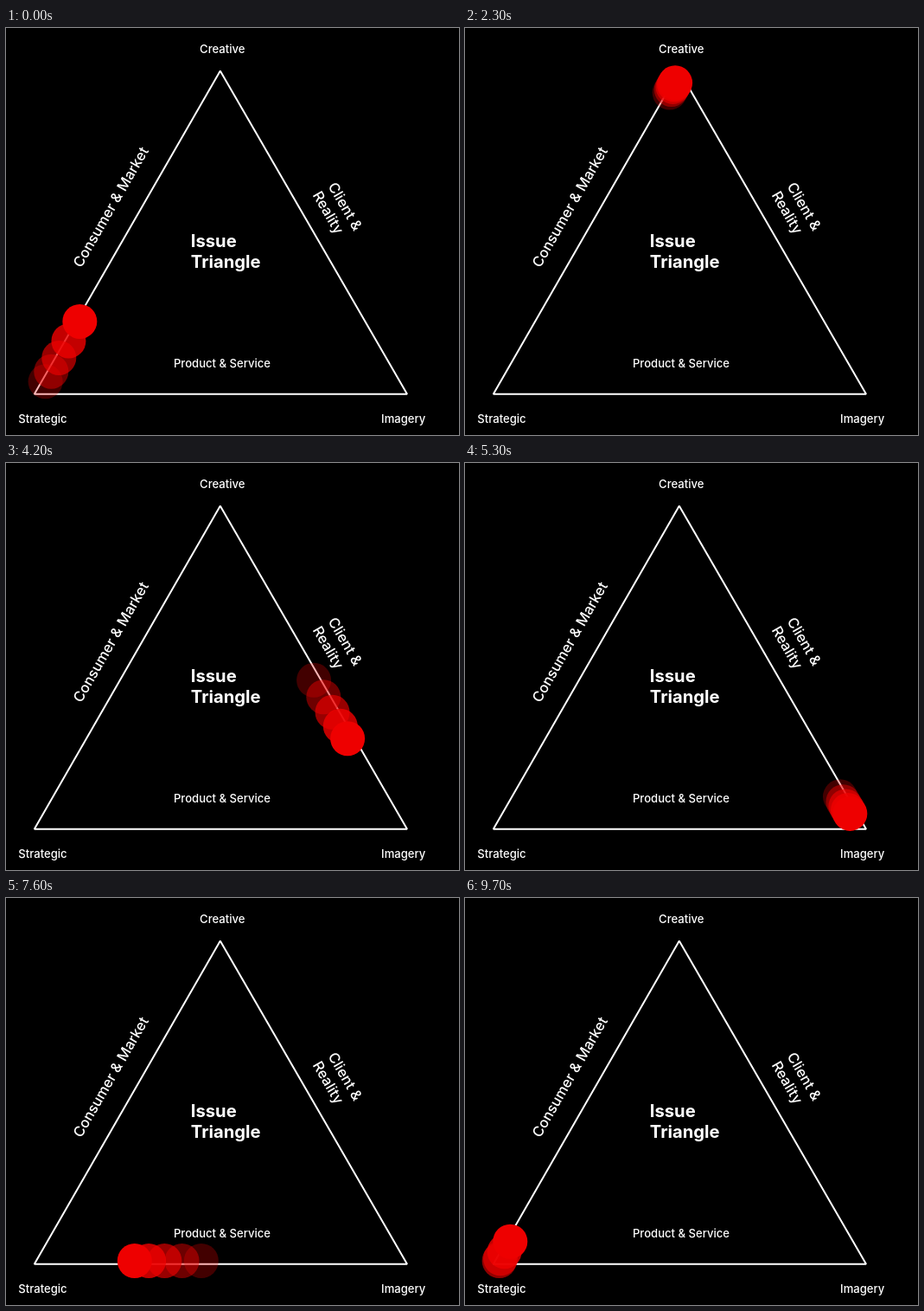
Animation, 524 px wide and 470 px high, one loop 9.8 s. Source, as an HTML page:

```html
<!DOCTYPE html>
<html lang="en">
<head>
<meta charset="utf-8">
<title>Issue Triangle</title>
<style>
  html, body { margin: 0; width: 100%; height: 100%; overflow: hidden; background: #000; }
  svg { display: block; font: 500 13.1px Inter, sans-serif; fill: #fff; }
  .title { font-size: 20.2px; font-weight: 700; }
  .side { font-size: 16.6px; }
  .edge { fill: none; stroke: #fff; stroke-width: 2; stroke-linejoin: bevel; }
  circle { fill: #ee0000; }
</style>
</head>
<body>
<svg width="524" height="470" viewBox="0 0 524 470">
  <path class="edge" d="M32.8 422.7 247.8 49.5 464 422.7Z"/>
  <g text-anchor="middle">
    <text x="250.3" y="29.3">Creative</text>
    <text x="42.5" y="455.7">Strategic</text>
    <text x="459.7" y="455.7">Imagery</text>
    <text x="250" y="391.7">Product &amp; Service</text>
    <text class="side" transform="translate(121 206.7) rotate(-60)" y="6">Consumer &amp; Market</text>
  </g>
  <g class="side" transform="translate(377.3 179.4) rotate(60)">
    <text y="6">Client &amp;</text>
    <text y="26.5">Reality</text>
  </g>
  <g class="title">
    <text x="213.8" y="252.7">Issue</text>
    <text x="213.8" y="276.7">Triangle</text>
  </g>
  <g id="trail"></g>
</svg>
<script>
const LOOP = 9800, STEP = 100, CYCLE = 10000, PHASE = 553;
const GHOSTS = 5, DELAY = 100;
const stops = [
  { at: 0, x: 39.5, y: 419 },
  { at: 3300, x: 245.3, y: 59.5 },
  { at: 6700, x: 453.5, y: 419 },
  { at: CYCLE, x: 39.5, y: 419 },
];

// cubic-bezier(.25, .1, .25, 1), solved for x by bisection
function ease(x) {
  let lo = 0, hi = 1, u;
  for (let i = 0; i < 24; i++) {
    u = (lo + hi) / 2;
    if (.75 * u * (1 - u) + u ** 3 < x) lo = u; else hi = u;
  }
  return .3 * u * (1 - u) ** 2 + 3 * u * u * (1 - u) + u ** 3;
}

function position(time) {
  const t = (time + CYCLE) % CYCLE;
  const i = stops.findIndex(stop => stop.at > t);
  const from = stops[i - 1], to = stops[i];
  const p = ease((t - from.at) / (to.at - from.at));
  return [from.x + (to.x - from.x) * p, from.y + (to.y - from.y) * p];
}

// Oldest ghost first, so the ball itself is painted on top
const trail = document.getElementById("trail");
const balls = Array.from({ length: GHOSTS }, (_, i) => {
  const age = GHOSTS - 1 - i;
  const el = document.createElementNS("http://www.w3.org/2000/svg", "circle");
  el.setAttribute("r", 20);
  el.setAttribute("opacity", 1 - .18 * age);
  trail.append(el);
  return { el, age };
});

function draw(now) {
  const time = Math.floor(now % LOOP / STEP) * STEP + PHASE;
  for (const { el, age } of balls) {
    const [x, y] = position(time - age * DELAY);
    el.setAttribute("cx", x);
    el.setAttribute("cy", y);
  }
}

function tick() {
  draw(performance.now());
  requestAnimationFrame(tick);
}
tick();
</script>
</body>
</html>
```
